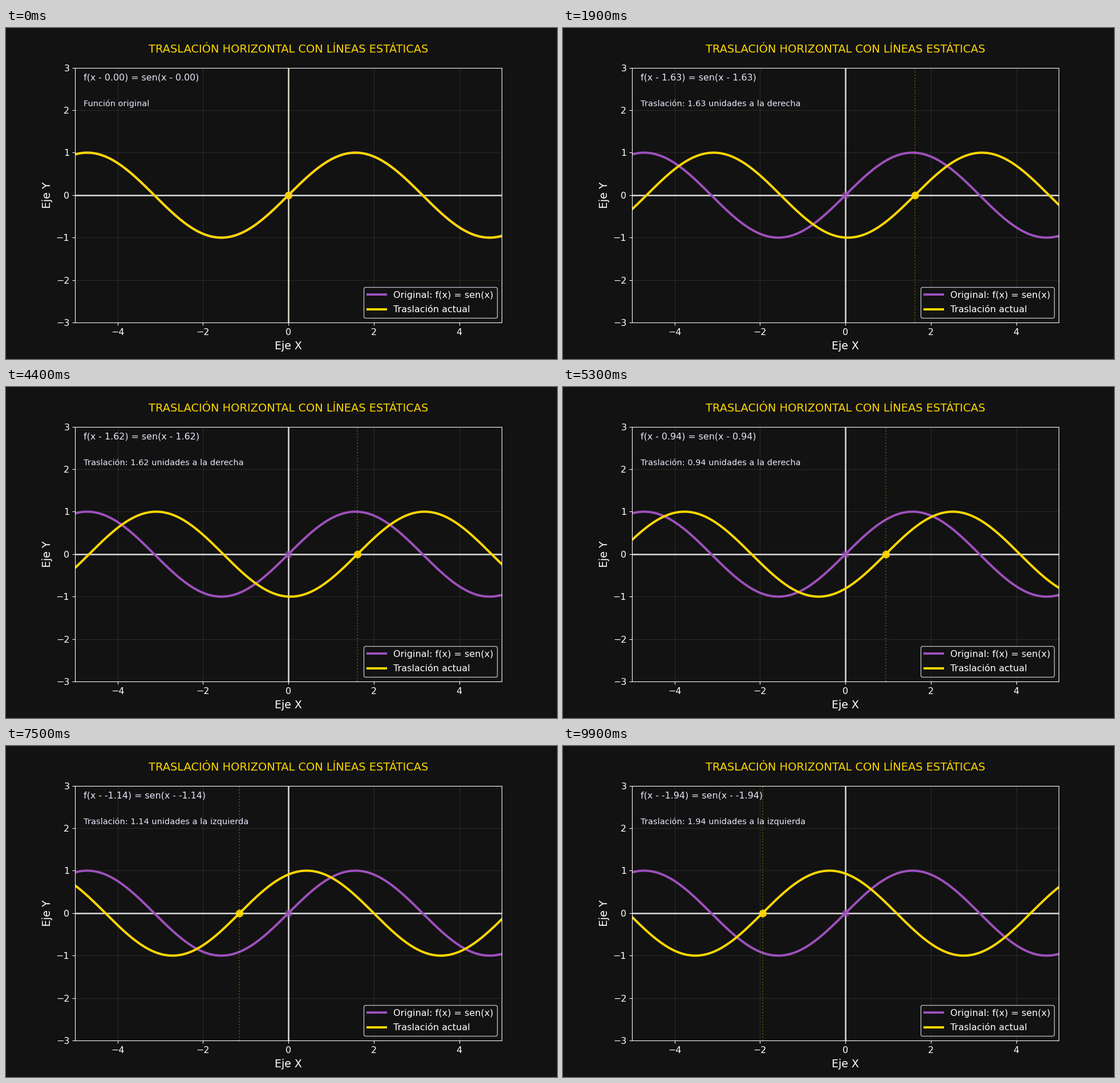
Animation of 966 by 580 pixels, one loop 10000 ms. Source, as a matplotlib script:

```python
import numpy as np
import matplotlib.pyplot as plt
from matplotlib.animation import FuncAnimation

W, H = 966, 580
DPI = 290 / 3
FRAMES = 100
BG, GOLD, PURPLE, SOFT = "#121212", "#FFD700", "#9D50BB", "#E6E6FA"

plt.style.use("dark_background")
plt.rcParams.update({"font.family": "DejaVu Sans", "font.size": 11.9,
                     "xtick.major.pad": 4.1})

fig, ax = plt.subplots(figsize=(W / DPI, H / DPI), dpi=DPI, facecolor=BG)
ax.set_facecolor(BG)
ax.set(xlim=(-5, 5), ylim=(-3, 3))
ax.grid(alpha=0.1)
ax.set_title("TRASLACIÓN HORIZONTAL CON LÍNEAS ESTÁTICAS", color=GOLD,
             fontsize=14.4, pad=20)
ax.set_xlabel("Eje X", fontsize=14.2, labelpad=4.6)
ax.set_ylabel("Eje Y", fontsize=14.2)

ax.axhline(0, color="white", lw=2, alpha=0.8)
ax.axvline(0, color="white", lw=2, alpha=0.8)

x = np.linspace(-5, 5, 500)
ax.plot(x, np.sin(x), color=PURPLE, lw=3, label="Original: f(x) = sen(x)")
curve, = ax.plot([], [], color=GOLD, lw=3, label="Traslación actual")
ax.plot(0, 0, "o", color=PURPLE, ms=9, alpha=0.5)
dot, = ax.plot([], [], "o", color=GOLD, ms=9, alpha=0.9)
guide = ax.axvline(0, color=GOLD, ls=":", lw=1.5, alpha=0.3)

formula = ax.text(-4.8, 2.7, "", color=SOFT, fontsize=11.85)
note = ax.text(-4.8, 2.1, "", color=SOFT, fontsize=10.85)
ax.legend(loc="lower right", facecolor=BG, edgecolor=SOFT,
          borderpad=0.44, labelspacing=0.64)


def describe(h):
    if h == 0:
        return "Función original"
    side = "derecha" if h > 0 else "izquierda"
    return f"Traslación: {abs(h):.2f} unidades a la {side}"


def update(i):
    h = 2 * np.sin(0.05 * i)
    curve.set_data(x, np.sin(x - h))
    dot.set_data([h], [0])
    guide.set_xdata([h, h])
    formula.set_text(f"f(x - {h:.2f}) = sen(x - {h:.2f})")
    note.set_text(describe(h))
    return curve, dot, guide, formula, note


anim = FuncAnimation(fig, update, frames=FRAMES, interval=100, repeat=True,
                     repeat_delay=0)
plt.show()
```
